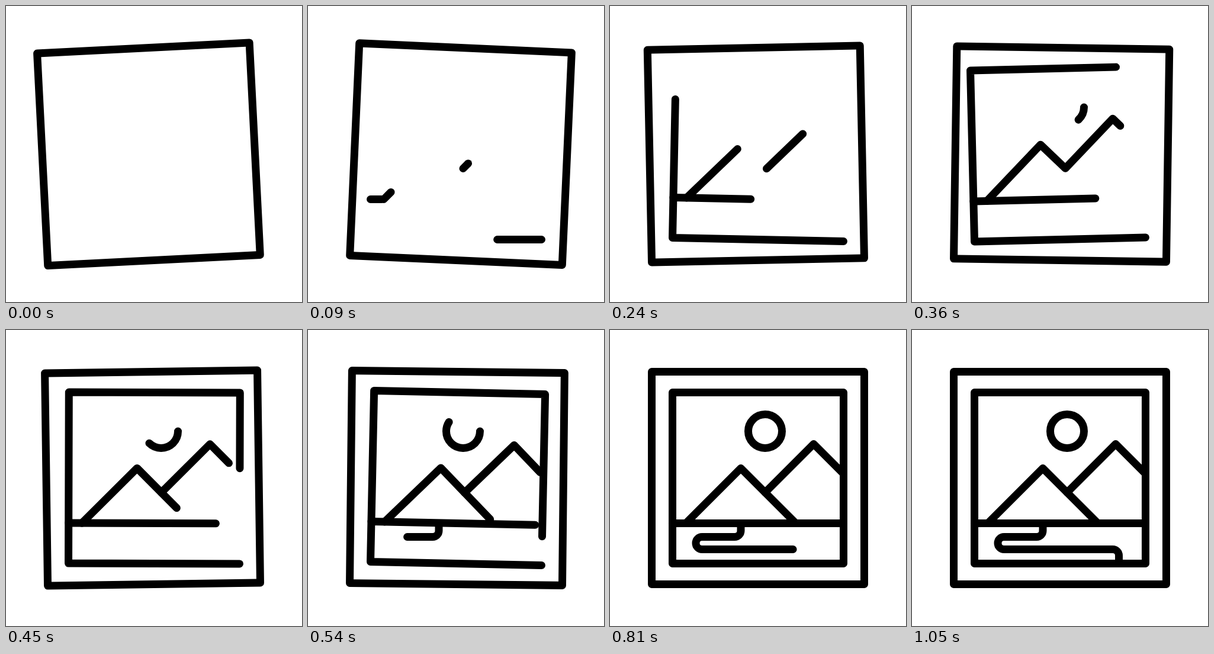
These frames come from a looping animation (500 px wide and 500 px high, 1.83 s). An HTML page:

```html
<!DOCTYPE html>
<html lang="en">
<head>
<meta charset="utf-8">
<title>Framed landscape</title>
<style>
  html, body { margin: 0; height: 100%; overflow: hidden; background: #fff; }
  svg { display: block; width: 100%; height: 100%; }
  path { fill: none; stroke: #000; stroke-width: 13; stroke-linecap: round; stroke-linejoin: round; }
</style>
</head>
<body>
<svg viewBox="0 0 500 500">
  <path id="frame" d="M70.5 70.5H429.5V429.5H70.5Z"/>
  <g id="scene">
    <path class="draw" data-start="66" data-span="582" d="M394.5 394.5H105.5V105.5H394.5Z"/>
    <path class="draw" data-start="66" data-span="582" d="M105.5 326.5H394.5"/>
    <path class="draw" data-start="66" data-span="582" d="M128 326.5L221 233.5L314 326.5"/>
    <path class="draw" data-start="66" data-span="582" d="M262 274.5L344 192.5L394.5 243"/>
  </g>
  <path class="draw" data-start="312" data-span="565" d="M290.5 171a28.5 28.5 0 0 1-57 0a28.5 28.5 0 0 1 57 0"/>
  <path class="draw" data-start="460" data-span="573" d="M221 326.5V339a10.5 10.5 0 0 1-10.5 10.5H155.5a10.5 10.5 0 0 0 0 21H339a10.5 10.5 0 0 1 10.5 10.5V394.5"/>
</svg>
<script>
const LOOP = 1830, STEP = 30;
const frame = document.getElementById('frame');
const scene = document.getElementById('scene');
const strokes = [...document.querySelectorAll('.draw')];
strokes.forEach(s => s.setAttribute('pathLength', 1));

// Swing extremes as [time in ms, angle in degrees]
const frameSwing = [[0, -2.9], [110, 3.03], [225, -1.25], [340, 1], [445, -.8], [530, .65], [600, 0]];
const sceneSwing = [[90, 0], [150, -1.6], [245, 1.2], [365, -1.4], [520, 1.3], [640, 0]];

function angleAt(keys, t) {
  const next = keys.findIndex(k => k[0] > t);
  if (next < 0) return keys[keys.length - 1][1];
  if (next === 0) return keys[0][1];
  const [t0, a0] = keys[next - 1], [t1, a1] = keys[next];
  return a0 + (a1 - a0) * (1 - Math.cos(Math.PI * (t - t0) / (t1 - t0))) / 2;
}

function swing(el, keys, t, pivotY) {
  el.setAttribute('transform', `rotate(${angleAt(keys, t)} 250 ${pivotY})`);
}

function draw(el, t) {
  const u = Math.min(1, (t - el.dataset.start) / el.dataset.span);
  el.style.visibility = u > 0 ? 'visible' : 'hidden';
  el.style.strokeDasharray = u < 1 ? `${Math.sin(Math.max(0, u) * Math.PI / 2)} 2` : 'none';
}

function render(now) {
  const t = Math.floor(now % LOOP / STEP) * STEP;
  swing(frame, frameSwing, t, 429.5);
  swing(scene, sceneSwing, t, 394.5);
  strokes.forEach(s => draw(s, t));
}

const begin = performance.now();
function tick() {
  render(performance.now() - begin);
  requestAnimationFrame(tick);
}
tick();
</script>
</body>
</html>
```
